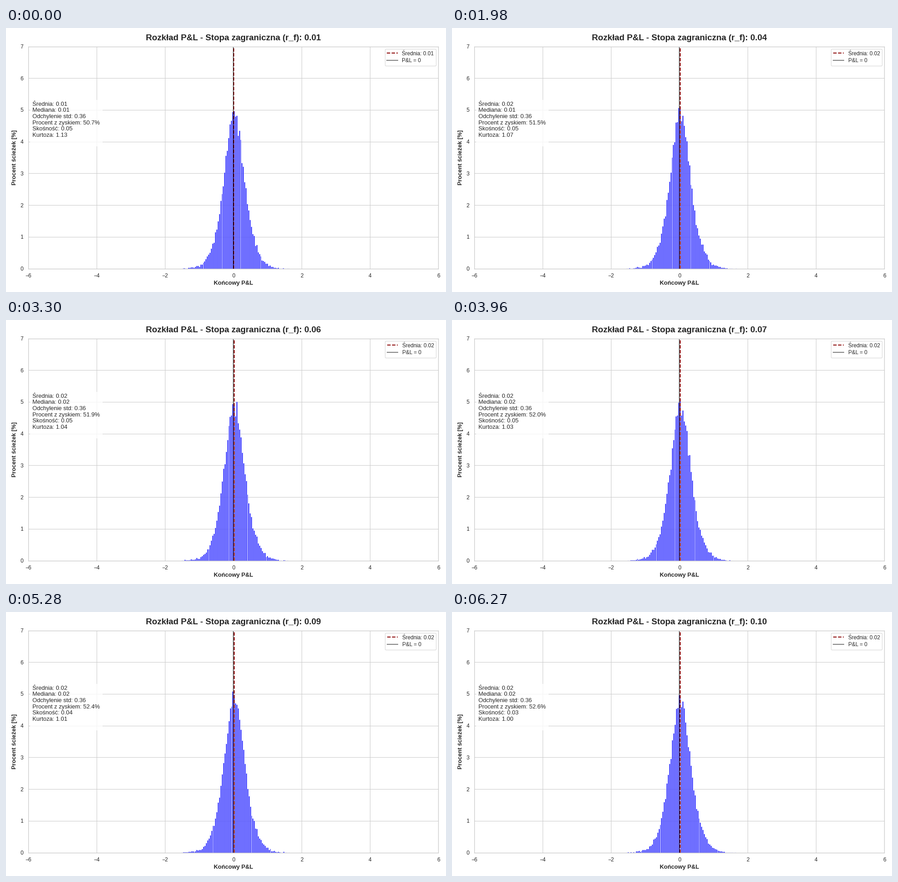
Recreate the animation shown at these times as a matplotlib script. Size 966 by 580 pixels, loop 6600 ms.

```python
import numpy as np
import matplotlib.pyplot as plt
from matplotlib.animation import FuncAnimation
from matplotlib.patches import Rectangle

W, H, DPI = 966, 580, 128
PX = 72 / DPI  # one pixel in points
FRAMES, INTERVAL = 20, 330
INK, PALE = "0.15", "0.8"

# Axes box in pixels from the bottom left
LEFT, BOTTOM, WIDTH, HEIGHT = 49.495, 51.43, 900, 488
UNIT = WIDTH / 12  # pixels per unit of x
ZERO = LEFT + WIDTH / 2

STEP = 2.93 / UNIT  # bin width
BINS = np.arange(-42, 43)
STD = .36
SHARED = np.random.default_rng(5).normal(0, .05, BINS.size)

plt.rcParams.update({
    "font.family": "Liberation Sans",
    "text.color": INK,
    "patch.linewidth": 1.07 * PX,
})


def mean_pnl(i):
    return .0131 + .00037 * i


def bin_centers(t):
    return (503.3 + .6 * t - ZERO) / UNIT + BINS * STEP


def heights(i, x):
    """Percent per bin: a logistic bell with sampling noise."""
    s = STD * np.sqrt(3) / np.pi
    bell = 100 * STEP / (4 * s) / np.cosh((x - mean_pnl(i)) / (2 * s)) ** 2
    noise = SHARED + np.random.default_rng(40 + i).normal(0, .04, BINS.size)
    return np.round(np.maximum(bell + noise * np.sqrt(bell), 0), 2)


def stat_lines(i, t):
    profit = np.interp(i, [0, 3, 8, 12, 14, 19],
                       [50.7, 51, 51.8, 52.02, 52.26, 52.56])
    return [
        f"Średnia: {mean_pnl(i):.2f}",
        f"Mediana: {.0125 + .005 * t:.2f}",
        f"Odchylenie std: {STD:.2f}",
        f"Procent z zyskiem: {profit:.1f}%",
        f"Skośność: {.05225 - .025 * t ** 3:.2f}",
        f"Kurtoza: {1.002 + .1282 * (1 - t) ** 1.7:.2f}",
    ]


def label(x, y, text, **kw):
    """Text on the figure, placed in pixels from the top left."""
    return fig.text(x / W, 1 - y / H, text, fontsize=12.87 * PX,
                    va="baseline", **kw)


fig = plt.figure(figsize=(W / DPI, H / DPI), dpi=DPI, facecolor="white")
ax = fig.add_axes([LEFT / W, BOTTOM / H, WIDTH / W, HEIGHT / H])
ax.set(xlim=(-6, 6), ylim=(0, 7), xticks=range(-6, 7, 2), yticks=range(8))
ax.set_axisbelow(True)
ax.grid(color=PALE, linewidth=1.07 * PX)
for spine in ax.spines.values():
    spine.set(color=PALE, linewidth=1.34 * PX)
for axis, pad in (("x", 10), ("y", 11.6)):
    ax.tick_params(axis=axis, length=0, pad=pad * PX, labelcolor=INK,
                   labelsize=11.8 * PX)

bars = ax.bar(BINS * STEP, 0 * BINS, width=STEP, color="blue", alpha=.8,
              edgecolor="white", linewidth=PX)
mean_line = ax.axvline(0, color="darkred", linestyle="--",
                       linewidth=2 * PX, label="Średnia")
ax.axvline(0, color="black", alpha=.5, linewidth=2 * PX, label="P&L = 0")
legend = ax.legend(loc="upper right", fontsize=11.8 * PX,
                   labelspacing=.33, borderaxespad=.45)
mean_label = legend.get_texts()[0]

title = ax.set_title("", fontsize=18.8 * PX, fontweight="bold",
                     pad=13.4 * PX)
label(ZERO, 564.3, "Końcowy P&L", weight="bold", ha="center")
label(22.5, 284.6, "Procent ścieżek [%]", weight="bold", ha="center",
      rotation=90, rotation_mode="anchor")

fig.add_artist(Rectangle((53 / W, 1 - 260 / H), 158.5 / W, 102 / H,
                         transform=fig.transFigure, facecolor="white",
                         edgecolor="none", alpha=.8, zorder=1))
stats = [label(57.7, 170.9 + 13.6 * row, "") for row in range(6)]


def update(i):
    t = i / (FRAMES - 1)
    mean = mean_pnl(i)
    lines = stat_lines(i, t)

    title.set_text(
        f"Rozkład P&L - Stopa zagraniczna (r_f): {.01 + .09 * t:.2f}")
    mean_label.set_text(lines[0])
    mean_line.set_xdata([mean, mean])
    for item, line in zip(stats, lines):
        item.set_text(line)

    centers = bin_centers(t)
    for bar, x, h in zip(bars, centers, heights(i, centers)):
        bar.set_x(x - STEP / 2)
        bar.set_height(h)
    return [title, mean_label, mean_line, *bars, *stats]


anim = FuncAnimation(fig, update, frames=FRAMES, interval=INTERVAL,
                     repeat=True, repeat_delay=0, blit=False)
plt.show()
```
